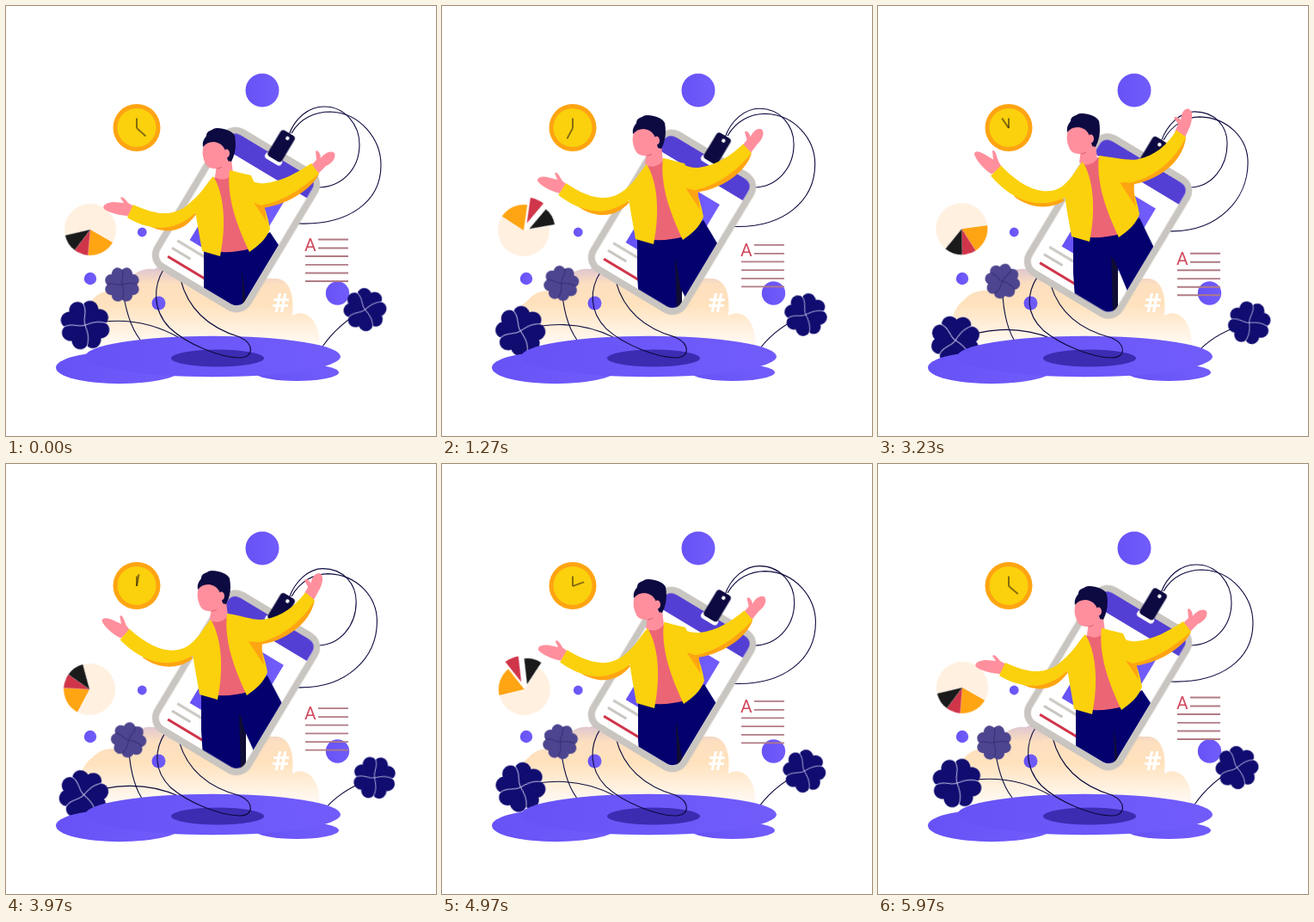
Recreate the animation shown at these times as an HTML page. Size 500 px wide and 500 px high, loop 6000 ms.

```html
<!DOCTYPE html>
<html lang="en">
<head>
<meta charset="utf-8">
<title>Profile card</title>
<style>
html, body { margin: 0; width: 100%; height: 100%; overflow: hidden; background: #fff; }
svg { display: block; width: 100vw; height: 100vh; }

/* Gentle sway between two poses: --a at the start, --b after 3 s */
.move, .morph { animation: move 3s cubic-bezier(.364, 0, .636, 1) infinite alternate; }
.morph { animation-name: morph; }
@keyframes move { from { transform: var(--a); } to { transform: var(--b); } }
@keyframes morph { from { d: var(--a); } to { d: var(--b); } }

.phone { --a: translate(0, 0); --b: translate(0, 7.5px); }
.unphone { --a: translate(0, 0); --b: translate(0, -7.5px); }

.body { animation: body 3s linear infinite alternate; }
@keyframes body {
  0% { transform: translate(3px, 17px); animation-timing-function: ease-in; }
  34.3% { transform: translate(1px, 10px); }
  42.3% { transform: translate(0, 3px); animation-timing-function: ease-out; }
  68%, 100% { transform: translate(0, 0); }
}
.head { animation: head 3s linear infinite alternate; }
@keyframes head {
  0% { transform: translate(3px, 1px); }
  34.3% { transform: translate(-1px, 0); }
  42.3% { transform: translate(-1px, 0); }
  68%, 75% { transform: translate(0, 0); }
  95%, 100% { transform: translate(-3.5px, 1px); }
}

.hand { animation: turn 6s linear infinite; }
@keyframes turn { from { transform: rotate(132deg); } to { transform: rotate(492deg); } }

.pie { animation: pie 6s linear infinite; }
@keyframes pie {
  0% { transform: rotate(0deg); animation-timing-function: ease-in; }
  21.17% { transform: rotate(183deg); }
  37.17% { transform: rotate(284deg); }
  53.83% { transform: rotate(322deg); }
  66.17% { transform: rotate(448deg); }
  82.83% { transform: rotate(496deg); animation-timing-function: ease-out; }
  100% { transform: rotate(720deg); }
}
.slice { animation: slice 6s ease-in-out infinite; }
@keyframes slice {
  0%, 12%, 34%, 70%, 94%, 100% { transform: translate(0, 0); }
  20%, 24%, 79%, 84% { transform: var(--out); }
}

.line { fill: none; stroke: #0c0a3e; stroke-width: 1.1; }
.skin { fill: #ff8f9d; }
.coat { fill: #fad10c; }
.shade { fill: #ffa412; }
.navy { fill: #04006e; }
.ink { fill: #0c0a40; }
.violet { fill: url(#violet); }
.rules { fill: none; stroke: #b07b84; stroke-width: 1.8; }
</style>
</head>
<body>
<svg viewBox="0 0 500 500">
  <defs>
    <linearGradient id="violet" x1="0" y1="0" x2="1" y2="0">
      <stop offset="0" stop-color="#6752f6"/><stop offset="1" stop-color="#715cfb"/>
    </linearGradient>
    <linearGradient id="haze" gradientUnits="userSpaceOnUse" x1="0" y1="300" x2="0" y2="394">
      <stop offset="0" stop-color="#d6bfd4"/><stop offset=".25" stop-color="#fddfbf"/>
      <stop offset=".5" stop-color="#ffe2bd"/><stop offset="1" stop-color="#fffaf5"/>
    </linearGradient>
    <clipPath id="screen">
      <rect x="-57.500" y="-87" width="115" height="174" rx="12" transform="translate(267.500 248.500) rotate(31)"/>
    </clipPath>
    <path id="leaf" d="M0 0C-7 -4 -18 -9 -17 -19C-15 -29 -4 -30 0 -24C4 -30 15 -29 17 -19C18 -9 7 -4 0 0Z"/>
    <g id="clover">
      <use href="#leaf"/><use href="#leaf" transform="rotate(90)"/>
      <use href="#leaf" transform="rotate(180)"/><use href="#leaf" transform="rotate(270)"/>
    </g>
    <path id="veins" fill="none" d="M-25 0C-15 -4 -8 2 0 0S15 -4 25 0M0 -25C4 -15 -2 -8 0 0S4 15 0 25"/>
  </defs>

  <!-- Backdrop -->
  <path fill="url(#haze)" d="M84 394C84 365 88 350 100 342C109 331 124 329 134 332C140 315 155 304 172 306C190 296 215 300 230 315L316 317C332 320 335 340 333 360C345 352 364 360 365 394Z"/>
  <text x="309.500" y="356" font-family="'Open Sans', sans-serif" font-weight="700" font-size="31" fill="#fff">#</text>
  <g class="violet">
    <circle cx="298" cy="98" r="19.500"/><circle cx="385.500" cy="334" r="13.700"/>
    <circle cx="177.500" cy="345.500" r="8"/><circle cx="98" cy="317" r="7.200"/>
    <circle cx="158.300" cy="263" r="5.400"/>
  </g>

  <!-- Clock -->
  <circle cx="152" cy="141.500" r="27.500" class="shade"/>
  <circle cx="152" cy="141.500" r="22.500" class="coat"/>
  <g transform="translate(152 142)" stroke="#3b2a10" stroke-width="1.200">
    <path d="M0 0V-11.500"/><path class="hand" d="M0 0V-14"/>
  </g>

  <!-- Pie chart -->
  <g transform="translate(96.500 260.500)"><g class="pie"><g transform="translate(1.500 -.5) rotate(30)">
    <path fill="#fff0e0" d="M0 0L-21.900 20.500A30 30 0 1 1 30 0Z"/>
    <path class="shade" d="M0 0L30 0A30 30 0 0 1 12.700 27.200Z"/>
    <path class="slice" style="--out:translate(1.5px,9px)" fill="#d0354a" d="M0 0L12.700 27.200A30 30 0 0 1 -3.700 29.800Z"/>
    <path class="slice" style="--out:translate(-4.5px,5px)" fill="#1a1a1a" d="M0 0L-3.700 29.800A30 30 0 0 1 -21.900 20.500Z"/>
  </g></g></g>

  <!-- Text block -->
  <g class="move" style="--a:translate(0,0);--b:translate(0,16.5px)">
    <text x="347" y="284.500" font-family="Roboto, sans-serif" font-size="21" fill="#d24a5e">A</text>
    <path class="rules" d="M363 271.500H398M363 281.500H398M348 291H398M348 300.800H398M348 310.500H398M348 320H398"/>
  </g>

  <!-- Plants -->
  <path class="line morph" style="--a:path('M92 371C120 364 160 362 202 386');--b:path('M90 389C120 376 162 370 202 387')"/>
  <path class="line morph" style="--a:path('M135 324C138 350 145 374 156 388');--b:path('M145 320C144 350 150 374 158 388')"/>
  <path class="line morph" style="--a:path('M417 353C400 362 382 376 368 396');--b:path('M432 369C412 374 390 384 374 400')"/>
  <g class="move" style="--a:translate(92px,371px) rotate(-5deg);--b:translate(90px,389px) rotate(-42deg)">
    <use href="#clover" fill="#110c70"/><use href="#veins" stroke="#c9c6ea"/>
  </g>
  <g class="move" style="--a:translate(135px,324px) rotate(0deg) scale(.71);--b:translate(145px,320px) rotate(35deg) scale(.71)">
    <use href="#clover" fill="#4d458f"/><use href="#veins" stroke="#2a2466"/>
  </g>
  <g class="move" style="--a:translate(417.5px,353px) rotate(-25deg) scale(.86);--b:translate(432px,368.500px) rotate(12deg) scale(.86)">
    <use href="#clover" fill="#110c70"/><use href="#veins" stroke="#c9c6ea"/>
  </g>

  <!-- Ground -->
  <g class="violet">
    <ellipse cx="132" cy="420.500" rx="74" ry="18.700"/>
    <ellipse cx="338" cy="426" rx="49" ry="10"/>
    <ellipse cx="240.500" cy="407.500" rx="148.500" ry="23.700"/>
  </g>
  <ellipse cx="246" cy="409.500" rx="54" ry="10" fill="#3b2cb2"/>

  <!-- Cords -->
  <path class="line morph" style="--a:path('M184 305C171 325 170 353 190 374C211 394 250 409 272 409C288 409 289 393 272 385C242 376 213 358 203 318');--b:path('M186 314C172 335 172 358 192 377C214 395 250 409 272 409C288 409 289 394 272 386C240 378 212 360 201 325')"/>
  <g class="line">
    <path class="morph" style="--a:path('M329 150C336 130 352 117 370 117C394 117 411 138 411 161C411 190 390 211 362 211');--b:path('M329 158C336 138 352 123 368 123C392 123 406 140 406 160C406 187 388 211 362 211')"/>
    <path class="morph" style="--a:path('M332 148C342 130 360 123 377 123C412 124 436 155 436 185C436 228 398 255 340 253');--b:path('M332 156C342 138 358 129 374 129C408 130 430 155 430 182C430 225 395 263 340 262')"/>
  </g>

  <!-- Phone -->
  <g class="move phone"><g transform="translate(267.500 248.500) rotate(31)">
    <rect x="-65.500" y="-95" width="131" height="190" rx="20" fill="#c9c5c0"/>
    <rect x="-57.500" y="-87" width="115" height="174" rx="12" fill="#fff"/>
    <path fill="#543fd4" d="M-57.500 -64V-75Q-57.500 -87 -45.500 -87H45.500Q57.500 -87 57.500 -75V-64Z"/>
    <rect x="-34" y="-46" width="71" height="94" class="violet"/>
    <g fill="none" stroke="#c9c5c0" stroke-width="3">
      <path d="M-46 56H-8M-47 66.500H-22"/><path stroke="#d0354a" d="M-46 77.500H8"/>
    </g>
    <rect x="-10" y="-87" width="22" height="8" rx="4" fill="#fff"/>
    <rect x="-8.500" y="-118" width="19" height="35" rx="4" class="ink"/>
    <circle cx="2.500" cy="-112" r="2.200" fill="#fff"/>
  </g></g>

  <!-- Legs, cut off by the screen -->
  <g class="move phone"><g clip-path="url(#screen)"><g class="move unphone"><g class="body">
    <path class="navy" d="M227 265L278 262L279 300V385H232L227 310Z"/>
    <path fill="#100d35" d="M271 291L279 301V385H274Z"/>
    <path class="navy morph" style="--a:path('M268 264L304 246L340 300L305 385L278 342Z');--b:path('M268 264L304 246L330 300L302 360L276 297Z')"/>
  </g></g></g></g>

  <!-- Person -->
  <g class="body">
    <path fill="#ec6575" d="M236 184L259 175C256 205 266 240 282 265Q264 270 246 269L250 230Z"/>
    <g class="head">
      <path class="skin" d="M239 166L256 160L258 177Q248 188 237 181Z"/>
      <path class="skin" d="M223 148C224 138 240 134 250 142C255 150 253 164 246 169C238 173 230 171 227 167C223 160 222 154 223 148Z"/>
      <path class="ink" d="M223 146C222 139 225 136 227 133C227 127 233 127 235 125C241 122 257 126 260 133C262 144 261 153 256 163L252 162L249 151C248 145 242 140 235 140C230 140 226 142 223 146Z"/>
      <ellipse class="skin" cx="250.500" cy="153.500" rx="3.500" ry="5"/>
      <path fill="none" stroke="#e0606f" d="M239 171Q242 171 245 169"/>
    </g>

    <path class="skin morph" style="--a:path('M139 227C130 227 116 223 111 219C108 214 116 211 123 211L134 212L130 206C132 203 137 209 139 212L146 216Z');--b:path('M132 195C124 190 115 180 112 172C112 167 118 168 124 172L134 178L133 168C136 165 138 174 140 180L144 187Z')"/>
    <path class="shade morph" style="--a:path('M160 237C180 248 202 249 219 224L205 222Z');--b:path('M158 221C178 237 202 236 217 226L205 215Z')"/>
    <path class="coat morph" style="--a:path('M238 181C230 190 223 202 213 210C195 228 175 228 145 214L138 229C160 242 190 250 219 222Z');--b:path('M238 181C231 190 224 202 214 210C197 221 171 215 143 185L131 197C150 219 180 240 217 223Z')"/>
    <path class="coat" d="M238 181C250 200 254 235 246 274L225 268C222 250 219 235 216 214C222 204 230 190 238 181Z"/>

    <path class="skin morph" style="--a:path('M352 168L358 162L357 152C360 149 363 156 363 160C367 154 375 150 379 154C381 160 376 166 369 169L360 178Z');--b:path('M345 146L349 137L344 130C345 126 350 130 352 132C352 124 356 118 361 119C367 122 365 132 363 139L357 152Z')"/>
    <path class="shade morph" style="--a:path('M355 172L361 178C353 196 322 216 292 218L285 205Z');--b:path('M352 150L358 153C354 182 325 204 292 208L285 200Z')"/>
    <path class="coat" d="M257 174C253 205 266 240 280 269C290 262 300 254 304 242C302 230 298 218 294 207L282 180Z"/>
    <path class="shade" d="M281 204L298 206C297 217 299 226 300 234C294 224 286 214 281 204Z"/>
    <path class="coat morph" style="--a:path('M257 174C272 176 280 191 298 189C318 187 335 177 352 166L361 178C343 194 318 211 293 215L266 203Z');--b:path('M257 174C275 176 292 180 302 178C322 174 336 162 347 144L358 152C346 178 323 198 295 205L266 205Z')"/>
  </g>
</svg>
</body>
</html>
```
